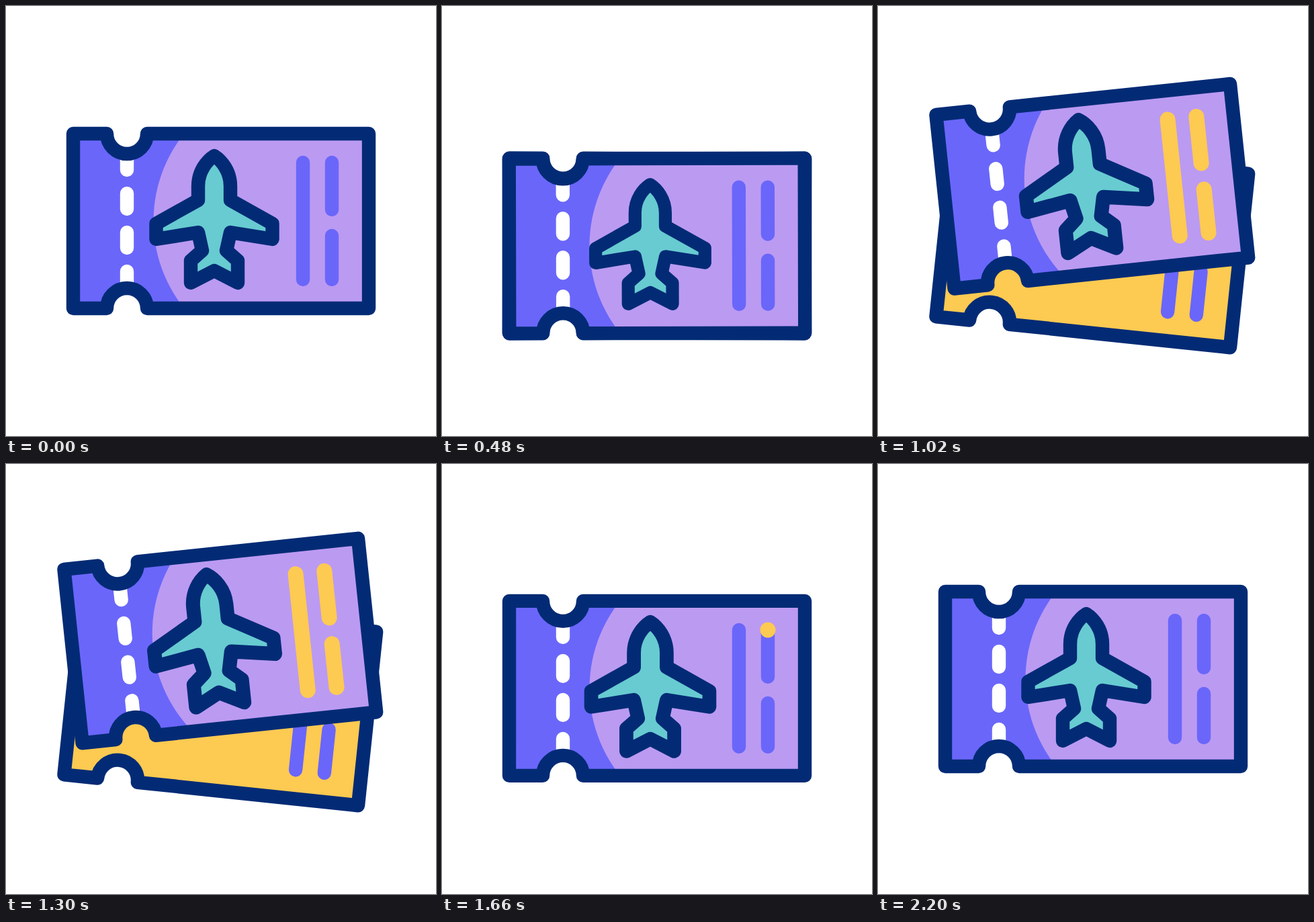
These frames come from a looping animation (640 by 640 pixels, 2400 ms). An HTML page:

```html
<!DOCTYPE html>
<html lang="en">
<head>
<meta charset="utf-8">
<title>Flight tickets</title>
<style>
  html, body { margin: 0; width: 100%; height: 100%; overflow: hidden; background: #fff; }
  svg { display: block; width: 100%; height: 100%; }
  .edge { fill: none; stroke: #032b75; stroke-width: 20.4; stroke-linejoin: round; }
  .bars, .perforation, .ink { fill: none; stroke-width: 20.4; stroke-linecap: round; }
  .bars { stroke: #6a66fa; }
  .perforation { stroke: #fff; stroke-dasharray: 23 35; }
  .ink { stroke: #fdca52; stroke-width: 23; }
</style>
</head>
<body>
<svg viewBox="0 0 640 640">
  <defs>
    <path id="shape" d="M100 190H150A30 30 0 0 0 210 190H540V450H210A30 30 0 0 0 150 450H100Z"/>
    <path id="bars"/>
    <clipPath id="inside"><use href="#shape"/></clipPath>
  </defs>
  <g id="back">
    <use href="#shape" fill="#fdca52"/>
    <use href="#bars" class="bars"/>
    <use href="#shape" class="edge"/>
  </g>
  <g id="front">
    <use href="#shape" fill="#6a66fa"/>
    <circle cx="428" cy="320" r="208.5" fill="#bb9af2" clip-path="url(#inside)"/>
    <path class="perforation" d="M180 221V418"/>
    <use href="#bars" class="bars"/>
    <g id="ink"></g>
    <use href="#shape" class="edge"/>
    <path id="plane" class="edge" style="fill:#67cbd1" d="M310 223C299 230 286 246 286 268V289L223.5 324V347L286 337L292 364L275 379V412L310 394L345 412V379L328 364L334 337L396.5 347V324L334 289V268C334 246 321 230 310 223Z"/>
  </g>
</svg>
<script>
const LOOP = 2400;
const TILT = 6;
const $ = id => document.getElementById(id);
const clamp = (v, lo, hi) => Math.min(hi, Math.max(lo, v));

// Eased 0..1 ramp between two times.
const ramp = (t, from, to) => (1 - Math.cos(Math.PI * clamp((t - from) / (to - from), 0, 1))) / 2;

// Each bar runs upwards; ink flows through them one after another.
const bars = [
  { x: 442, bottom: 407, top: 233 },
  { x: 485, bottom: 407, top: 342 },
  { x: 485, bottom: 303, top: 233 },
];
$("bars").setAttribute("d", bars.map(b => `M${b.x} ${b.bottom}V${b.top}`).join(""));

let inkLength = 0;
for (const bar of bars) {
  bar.length = bar.bottom - bar.top;
  bar.start = inkLength;
  inkLength += bar.length;
  bar.ink = document.createElementNS("http://www.w3.org/2000/svg", "path");
  bar.ink.setAttribute("class", "ink");
  $("ink").append(bar.ink);
}

function drawInk(from, to) {
  for (const { x, bottom, length, start, ink } of bars) {
    const a = clamp(from * inkLength - start, 0, length);
    const b = clamp(to * inkLength - start, 0, length);
    ink.setAttribute("d", b - a > 0.01 ? `M${x} ${bottom - a}V${bottom - b}` : "");
  }
}

function place(id, y, angle) {
  const drift = -Math.abs(angle) / 5;
  $(id).setAttribute("transform", `translate(${drift} ${y}) rotate(${angle} 320 320)`);
}

function draw(t) {
  const angle = TILT * (ramp(t, 460, 690) - ramp(t, 1320, 1545));
  const dip = 37 * ramp(t, 220, 480);
  const landing = 29 * ramp(t, 1860, 2200) - 49 * ramp(t, 1600, 1860);
  const rise = 1 - Math.exp(-Math.max(0, t - 512) / 192);

  const frontY = dip - 95.5 * rise + 78.5 * ramp(t, 1320, 1600) + landing;
  const backY = dip + 10 * ramp(t, 480, 600) - 11 * ramp(t, 600, 1020)
    - 16 * ramp(t, 1410, 1600) + landing;
  place("front", frontY, -angle);
  place("back", backY, angle);
  $("back").setAttribute("visibility", t > 460 && t < 1600 ? "visible" : "hidden");

  const scale = 1 - 0.06 * ramp(t, 220, 480) + 0.094 * ramp(t, 480, 1040)
    - 0.034 * ramp(t, 1100, 2200);
  $("plane").setAttribute("transform",
    `translate(310 317.3) scale(${scale}) translate(-310 -317.3)`);
  drawInk(ramp(t, 1405, 1665), ramp(t, 485, 742));
}

const begin = performance.now();
function tick() {
  draw((performance.now() - begin) % LOOP);
  requestAnimationFrame(tick);
}
tick();
</script>
</body>
</html>
```
